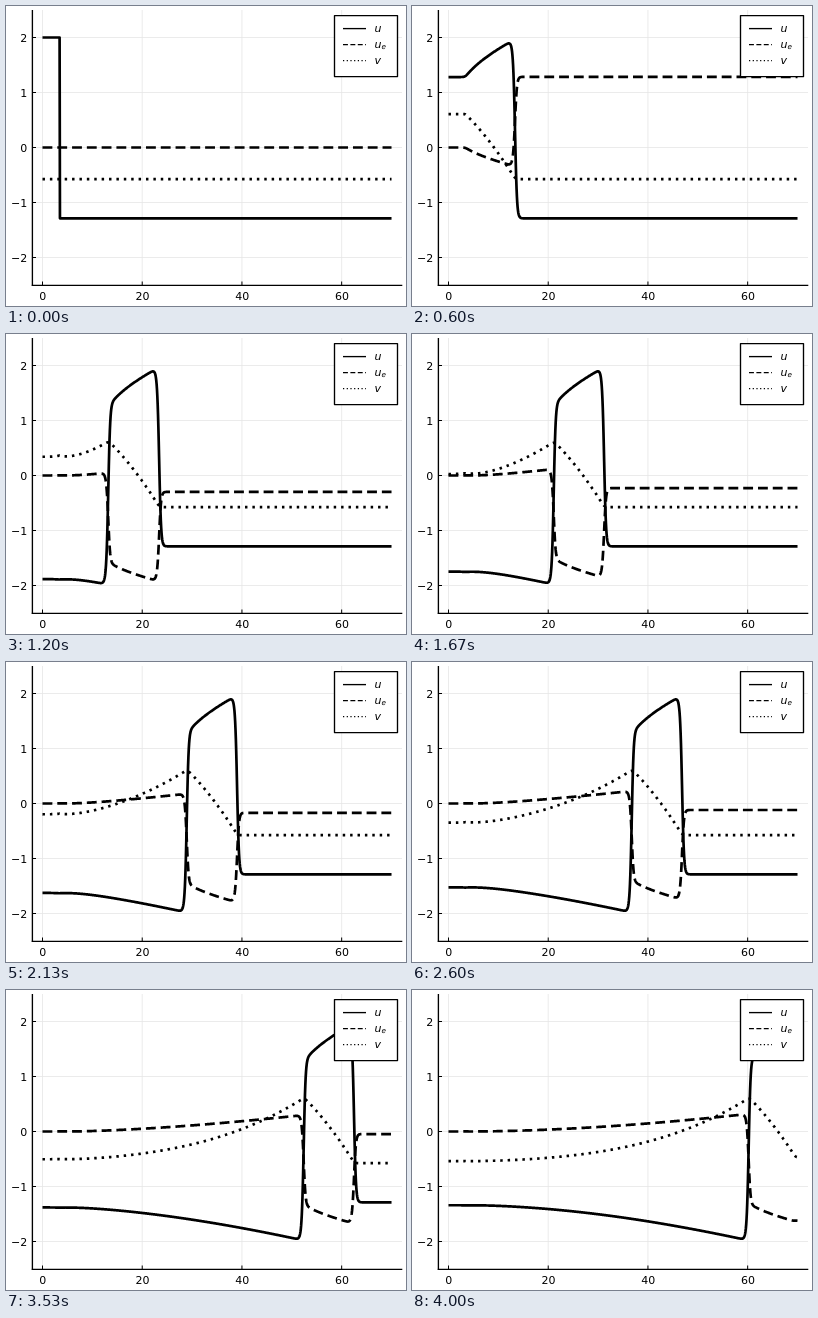
These frames come from a looping animation (400 by 300 pixels, 4.07 s). An HTML page with a canvas:

```html
<!DOCTYPE html>
<html lang="en">
<head>
<meta charset="utf-8">
<title>Travelling pulse</title>
<style>
  html, body { margin: 0; width: 100%; height: 100%; overflow: hidden; background: #fff; }
  canvas { display: block; width: 400px; height: 300px; }
</style>
</head>
<body>
<canvas id="plot" width="400" height="300"></canvas>
<script>
const ctx = document.getElementById('plot').getContext('2d');

// Excitable medium: u_t = D u_xx + (u - u^3/3 - v)/EPS,  v_t = EPS (u + 1 - v/2)
const LEN = 70, N = 1000, H = LEN / N;
const EPS = 0.1, BETA = 1, GAMMA = 0.5;
const DT = 0.1, STEPS = 5;
const COUNT = 61, LOOP = 4070, FRAME = 200 / 3;
const U_REST = -1.28791, V_REST = (U_REST + BETA) / GAMMA;
const STIM = LEN / 20;

// One implicit Euler step, Newton iteration with a tridiagonal solve
function step(u, v, D) {
  const a = D / (H * H), k = 1 + DT * EPS * GAMMA, dv = DT * EPS / k;
  const old = u.slice(), up = new Float64Array(N + 1), rhs = new Float64Array(N + 1);
  const nextV = i => (v[i] + DT * EPS * (u[i] + BETA)) / k;
  for (let iter = 0; iter < 20; iter++) {
    for (let i = 0; i <= N; i++) {
      const x = u[i];
      const lo = i === 0 ? 0 : i === N ? 2 * a : a;
      const hi = i === N ? 0 : i === 0 ? 2 * a : a;
      const left = i ? u[i - 1] : 0, right = i < N ? u[i + 1] : 0;
      const res = (x - old[i]) / DT - (x - x * x * x / 3 - nextV(i)) / EPS
        - lo * (left - x) - hi * (right - x);
      const diag = 1 / DT - (1 - x * x - dv) / EPS + 2 * a;
      const m = diag + (i ? lo * up[i - 1] : 0);
      up[i] = -hi / m;
      rhs[i] = (-res + (i ? lo * rhs[i - 1] : 0)) / m;
    }
    let worst = 0, d = 0;
    for (let i = N; i >= 0; i--) {
      d = rhs[i] - up[i] * d;
      u[i] += d;
      worst = Math.max(worst, Math.abs(d));
    }
    if (worst < 1e-7) break;
  }
  for (let i = 0; i <= N; i++) v[i] = nextV(i);
}

function simulate(D, count) {
  const u = new Float64Array(N + 1), v = new Float64Array(N + 1).fill(V_REST);
  for (let i = 0; i <= N; i++) u[i] = i * H < STIM - 1e-9 ? 2 : U_REST;
  const states = [];
  for (let n = 0; n < count; n++) {
    if (n) for (let s = 0; s < STEPS; s++) step(u, v, D);
    const e = n ? u.map(x => (u[0] - x) / 2) : new Float64Array(N + 1);
    states.push({ u: u.slice(), e, v: v.slice() });
  }
  return states;
}

function frontOf(u) {
  let i = N - 1;
  while (i > 0 && u[i] <= 0) i--;
  return (i + u[i] / (u[i] - u[i + 1])) * H;
}

// Distances scale with sqrt(D): a trial run fixes D so the front is at MARK at step MARK_N
const MARK = 55.85, MARK_N = 47, D0 = 0.5;
const trial = frontOf(simulate(D0, MARK_N + 1)[MARK_N].u);
const states = simulate(D0 * ((MARK - STIM) / (trial - STIM)) ** 2, COUNT);

const px = x => 36.5 + x * 4.986;
const py = y => 141.5 - y * 55;
const UNIT = 1.232;
const DASH = [8 * UNIT, 4 * UNIT], DOT = [2 * UNIT, 4 * UNIT];

function line(x1, y1, x2, y2, width, color = '#000', dash = []) {
  ctx.strokeStyle = color;
  ctx.lineWidth = width;
  ctx.setLineDash(dash);
  ctx.beginPath();
  ctx.moveTo(x1, y1);
  ctx.lineTo(x2, y2);
  ctx.stroke();
}

function curve(data, dash) {
  ctx.strokeStyle = '#000';
  ctx.lineWidth = 2.7;
  ctx.lineJoin = 'round';
  ctx.setLineDash(dash);
  ctx.beginPath();
  data.forEach((y, i) => ctx.lineTo(px(i * H), py(y)));
  ctx.stroke();
}

function text(str, x, y, align, font) {
  ctx.font = font || '11px "DejaVu Sans", sans-serif';
  ctx.textAlign = align;
  ctx.fillStyle = '#000';
  ctx.fillText(str, x, y);
}

const XT = [0, 20, 40, 60], YT = [-2, -1, 0, 1, 2];

function axes() {
  XT.forEach(x => line(px(x), 4, px(x), 279, 0.8, '#e6e6e6'));
  YT.forEach(y => line(26.5, py(y), 396, py(y), 0.8, '#e6e6e6'));
  line(26.4, 4, 26.4, 280, 1.35);
  line(25.8, 279.4, 396.3, 279.4, 1.35);
  XT.forEach(x => {
    line(px(x), 279, px(x), 275.5, 1);
    text(String(x), px(x) + 0.35, 294, 'center');
  });
  YT.forEach(y => {
    line(26.5, py(y), 30, py(y), 1);
    text(String(y).replace('-', '\u2212'), 21.3, py(y) + 4.5, 'right');
  });
}

function legend() {
  const math = size => `italic ${size}px "DejaVu Sans", sans-serif`;
  ctx.setLineDash([]);
  ctx.fillStyle = '#fff';
  ctx.fillRect(328.5, 9.6, 63, 61);
  ctx.strokeStyle = '#000';
  ctx.lineWidth = 1.35;
  ctx.strokeRect(328.5, 9.6, 63, 61);
  [[], DASH, DOT].forEach((dash, i) => {
    const y = 22.6 + i * 16;
    line(337, y, 360, y, 1.35, '#000', dash.map(d => d / 2));
    text(i < 2 ? 'u' : 'v', 368.6, y + 3.6, 'left', math(11));
  });
  text('e', 375.6, 43.4, 'left', math(7.2));
}

function draw(n) {
  const s = states[n];
  ctx.fillStyle = '#fff';
  ctx.fillRect(0, 0, 400, 300);
  axes();
  curve(s.u, []);
  curve(s.e, DASH);
  curve(s.v, DOT);
  legend();
}

const start = performance.now();
function tick() {
  const t = (performance.now() - start) % LOOP;
  draw(Math.min(COUNT - 1, Math.floor((t + 4) / FRAME)));
  requestAnimationFrame(tick);
}
tick();
</script>
</body>
</html>
```
